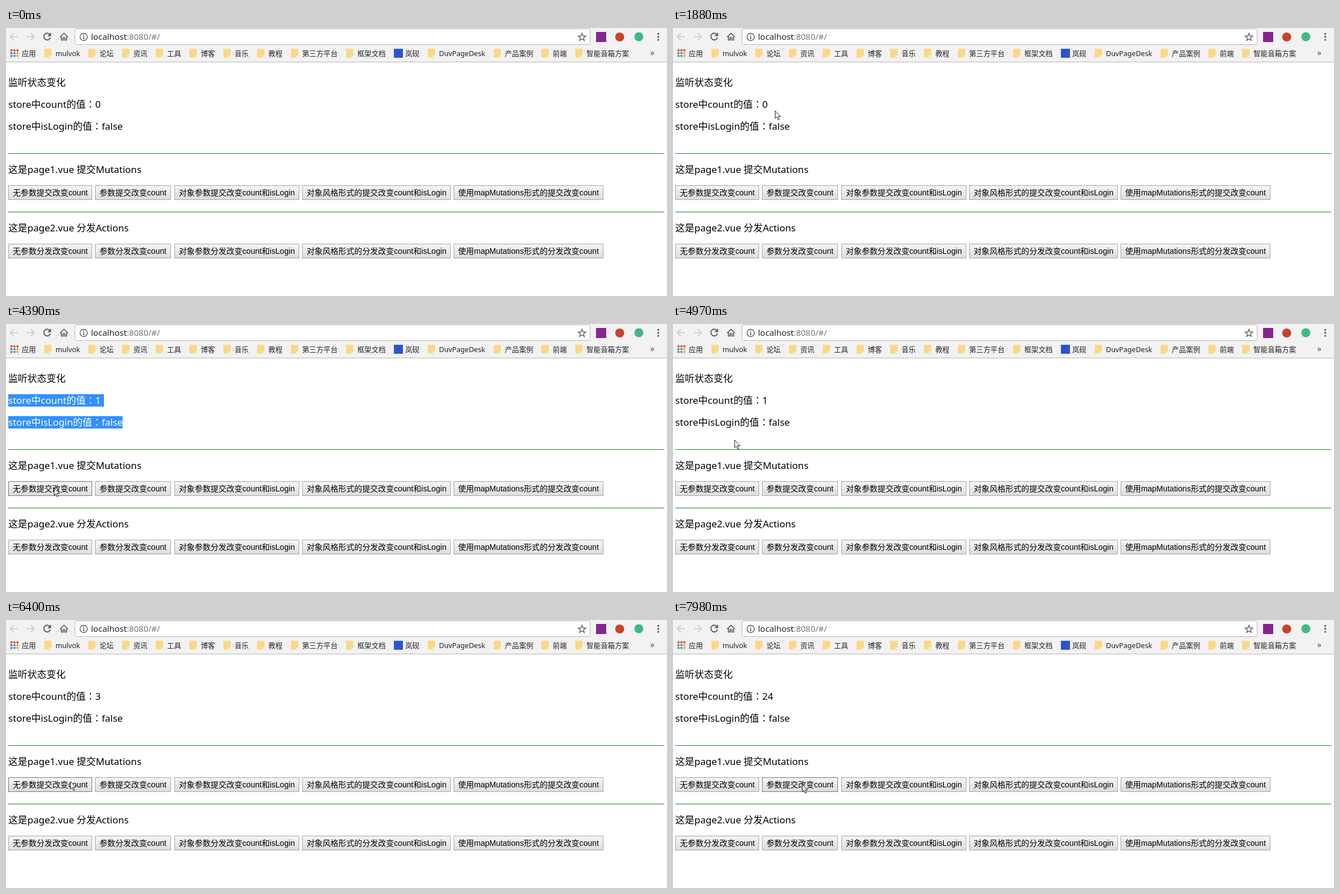
Recreate the animation shown at these times as an HTML page with a canvas. Size 1174 by 477 pixels, loop 8 s.

```html
<!DOCTYPE html>
<html lang="zh-CN">
<head>
<meta charset="utf-8">
<title>store</title>
<style>
html, body { margin: 0; width: 100%; height: 100%; overflow: hidden; background: #fff; }
canvas { display: block; }
</style>
</head>
<body>
<canvas id="stage" width="1174" height="477"></canvas>
<script>
const ctx = document.getElementById('stage').getContext('2d');
const LOOP = 8000;
const UI = '"Noto Sans", "Noto Sans CJK SC", sans-serif';
const BODY = '17px ' + UI;
const SMALL = '12.6px ' + UI;
const COLON = '17px "Noto Sans CJK JP", sans-serif';
const BUTTON = '14.1px "Liberation Sans", "Noto Sans CJK SC", sans-serif';
const INK = '#5a5a5a';
const TAU = Math.PI * 2;

// The pointer reaches each stop at its time, after a move of at most TRAVEL ms
const TRAVEL = 450;
const STEPS = 6;
const stop = (t, x, y) => ({ t, x, y });
const STOPS = [
  stop(160, 750, 377), stop(550, 409, 194), stop(940, 68, 10), stop(1260, 98, 35),
  stop(1880, 181, 147), stop(2260, 143, 119), stop(2660, 206, 155), stop(2950, 212, 157),
  stop(3360, 206, 159), stop(4050, 85, 291), stop(4830, 109, 206), stop(5780, 114, 287),
  stop(7040, 207, 301), stop(7430, 229, 292)
];

const PRESS = 100;
const CLICKS = [
  { add: 1, releases: [4390, 6010, 6400, 6620] },
  { add: 10, releases: [7600, 7980] }
];

const RELOAD = { from: 940, to: 1410 };
const SELECT = { from: 2340, nextLine: 2580, to: 4970 };

const SITE = '岚砚';
const BOOKMARKS = ['mulvok', '论坛', '资讯', '工具', '博客', '音乐', '教程', '第三方平台',
  '框架文档', SITE, 'DuvPageDesk', '产品案例', '前端', '智能音箱方案'];

const clamp = v => Math.min(1, Math.max(0, v));

function widthOf(value, font) {
  ctx.font = font;
  return ctx.measureText(value).width;
}

function rect(x, y, w, h, color) {
  ctx.fillStyle = color;
  ctx.fillRect(x, y, w, h);
}

function disc(x, y, r, color) {
  ctx.fillStyle = color;
  ctx.beginPath();
  ctx.arc(x, y, r, 0, TAU);
  ctx.fill();
}

function text(value, x, y, font, color) {
  ctx.font = font;
  ctx.fillStyle = color;
  ctx.fillText(value, x, y);
  return x + ctx.measureText(value).width;
}

function stroke(path, color, width) {
  ctx.strokeStyle = color;
  ctx.lineWidth = width;
  ctx.stroke(new Path2D(path));
}

function buttonRow(y, verb) {
  const labels = ['无参数#改变count', '参数#改变count', '对象参数#改变count和isLogin',
    '对象风格形式的#改变count和isLogin', '使用mapMutations形式的#改变count'];
  let x = 4;
  return labels.map(pattern => {
    const label = pattern.replace('#', verb);
    const w = widthOf(label, BUTTON) + 16;
    const box = { x: Math.round(x), y, w: Math.round(w), h: 26, label };
    x += w + 5.2;
    return box;
  });
}
const BUTTONS = [...buttonRow(280, '提交'), ...buttonRow(384, '分发')];

function pointerAt(t) {
  if (t < STOPS[0].t) return null;
  const next = STOPS.findIndex(s => s.t > t);
  if (next < 0) return STOPS[STOPS.length - 1];
  const a = STOPS[next - 1], b = STOPS[next];
  const start = Math.max(a.t, b.t - TRAVEL);
  const p = Math.floor(clamp((t - start) / (b.t - start)) * STEPS) / STEPS;
  const ease = p * p * (3 - 2 * p);
  return { x: Math.round(a.x + (b.x - a.x) * ease), y: Math.round(a.y + (b.y - a.y) * ease) };
}

const countAt = t => CLICKS.reduce(
  (sum, c) => sum + c.add * c.releases.filter(r => t >= r).length, 0);

const pressedAt = t => CLICKS.some(
  c => c.releases.some(r => t >= r - PRESS && t < r));

function drawNavigation(loading) {
  stroke('M21 15.5H8M14 9L7.5 15.5L14 22', '#cfcfcf', 1.8);
  stroke('M37 15.5H50M44 9L50.5 15.5L44 22', '#cfcfcf', 1.8);
  if (loading) {
    stroke('M68 10L79 21M79 10L68 21', INK, 2);
  } else {
    stroke('M78 11.5A6 6 0 1 0 79 17', INK, 1.9);
    ctx.fillStyle = INK;
    ctx.fill(new Path2D('M80 8V14.5H73.5Z'));
  }
  stroke('M96 16L103 9.5L110 16M98.5 15V21.5H101.5V17H104.5V21.5H107.5V15', INK, 1.7);
}

function drawStar(x, y) {
  ctx.beginPath();
  for (let i = 0; i < 10; i++) {
    const a = -TAU / 4 + i * TAU / 10, r = i % 2 ? 3 : 7;
    ctx.lineTo(x + r * Math.cos(a), y + r * Math.sin(a));
  }
  ctx.closePath();
  ctx.strokeStyle = INK;
  ctx.lineWidth = 1.4;
  ctx.stroke();
}

function drawAddressBar() {
  ctx.beginPath();
  ctx.roundRect(122.5, 1.5, 915, 28, 3);
  ctx.fillStyle = '#fff';
  ctx.fill();
  ctx.strokeStyle = '#b8b8b8';
  ctx.lineWidth = 1;
  ctx.stroke();
  stroke('M144.5 16A6.5 6.5 0 1 0 131.5 16A6.5 6.5 0 1 0 144.5 16', INK, 1.4);
  stroke('M138 12V13.8M138 15V20', INK, 1.7);
  const x = text('localhost', 151, 21, '15px ' + UI, '#222');
  text(':8080/#/', x, 21, '15px ' + UI, '#777');
  drawStar(1023, 16.5);
}

function drawToolbar(t) {
  rect(0, 0, 1174, 60, '#f2f2f2');
  rect(0, 60, 1174, 1, '#b5b5b5');
  drawNavigation(t >= RELOAD.from && t < RELOAD.to);
  drawAddressBar();
  rect(1048, 7, 18, 18, '#87258f');
  disc(1090, 16, 8, '#c8432b');
  disc(1124, 15.5, 8, '#41b883');
  for (let i = 0; i < 3; i++) disc(1158.5, 10.5 + i * 5.3, 1.7, INK);
}

function drawBookmarks() {
  const palette = ['#d9483b', '#e8a33d', '#3f9b62', '#4a86d8'];
  for (let i = 0; i < 9; i++) {
    const row = Math.floor(i / 3);
    rect(8 + i % 3 * 5.3, 38 + row * 5, 3.5, 3.5, palette[row ? 1 + (i + 1) % 3 : 0]);
  }
  text('应用', 28, 50, SMALL, '#222');
  let x = 68;
  for (const label of BOOKMARKS) {
    const left = Math.round(x);
    if (label === SITE) {
      rect(left, 37, 16, 16, '#2a55d0');
    } else {
      ctx.beginPath();
      ctx.roundRect(left, 37, 13, 15.5, 1.5);
      ctx.fillStyle = '#fbd884';
      ctx.fill();
      rect(left + 9, 49, 4, 3, '#fff0c2');
    }
    x = text(label, left + 20, 50, SMALL, '#222') + 14.6;
  }
  text('»', 1144, 49, '15px ' + UI, '#444');
}

function drawButton(b, pointer, pressed) {
  const hover = pointer && pointer.x >= b.x && pointer.x < b.x + b.w &&
    pointer.y >= b.y && pointer.y < b.y + b.h;
  const active = hover && pressed;
  const shade = ctx.createLinearGradient(0, b.y, 0, b.y + b.h);
  shade.addColorStop(0, active ? '#d4d4d4' : '#f6f6f6');
  shade.addColorStop(1, active ? '#ececec' : '#dcdcdc');
  rect(b.x, b.y, b.w, b.h, shade);
  ctx.strokeStyle = hover ? '#777' : '#a6a6a6';
  ctx.lineWidth = 1;
  ctx.strokeRect(b.x + .5, b.y + .5, b.w - 1, b.h - 1);
  text(b.label, b.x + 8, b.y + 18, BUTTON, '#000');
}

function stateLine(name, value, y, color) {
  const x = text(`store中${name}的值`, 4, y, BODY, color);
  text(value, text('：', x, y, COLON, color), y, BODY, color);
  return x;
}

function selectedLine(name, value, y, from, to) {
  ctx.save();
  ctx.beginPath();
  ctx.rect(from, y - 17, to - from, 22);
  ctx.clip();
  rect(from, y - 17, to - from, 22, '#3390ff');
  stateLine(name, value, y, '#fff');
  ctx.restore();
}

function drawState(t, pointer) {
  const count = countAt(t);
  text('监听状态变化', 4, 103, BODY, '#000');
  const anchor = stateLine('count', count, 142, '#000');
  stateLine('isLogin', 'false', 181, '#000');
  if (t < SELECT.from || t >= SELECT.to) return;
  const both = t >= SELECT.nextLine;
  const end = both ? 174 : Math.max(anchor, Math.min(pointer.x, 169));
  selectedLine('count', count, 142, count ? 4 : anchor, end);
  if (both) selectedLine('isLogin', 'false', 181, 4, 207);
}

function drawSection(y, title) {
  rect(4, y, 1165, 1, '#1b7a1b');
  text(title, 4, y + 35, BODY, '#000');
}

function drawPointer({ x, y }) {
  ctx.save();
  ctx.translate(x + .5, y + .5);
  const arrow = new Path2D('M0 0V13.5L3 10.7L5.2 16L7.4 15L5.2 10H9.5Z');
  ctx.fillStyle = '#fff';
  ctx.fill(arrow);
  ctx.strokeStyle = '#1b1b2b';
  ctx.lineWidth = 1;
  ctx.stroke(arrow);
  ctx.restore();
}

function draw(t) {
  const pointer = pointerAt(t);
  const pressed = pressedAt(t);
  rect(0, 0, 1174, 477, '#fff');
  drawToolbar(t);
  drawBookmarks();
  drawState(t, pointer);
  drawSection(223, '这是page1.vue 提交Mutations');
  drawSection(327, '这是page2.vue 分发Actions');
  for (const b of BUTTONS) drawButton(b, pointer, pressed);
  if (pointer) drawPointer(pointer);
}

function tick() {
  draw(performance.now() % LOOP);
  requestAnimationFrame(tick);
}
tick();
</script>
</body>
</html>
```
